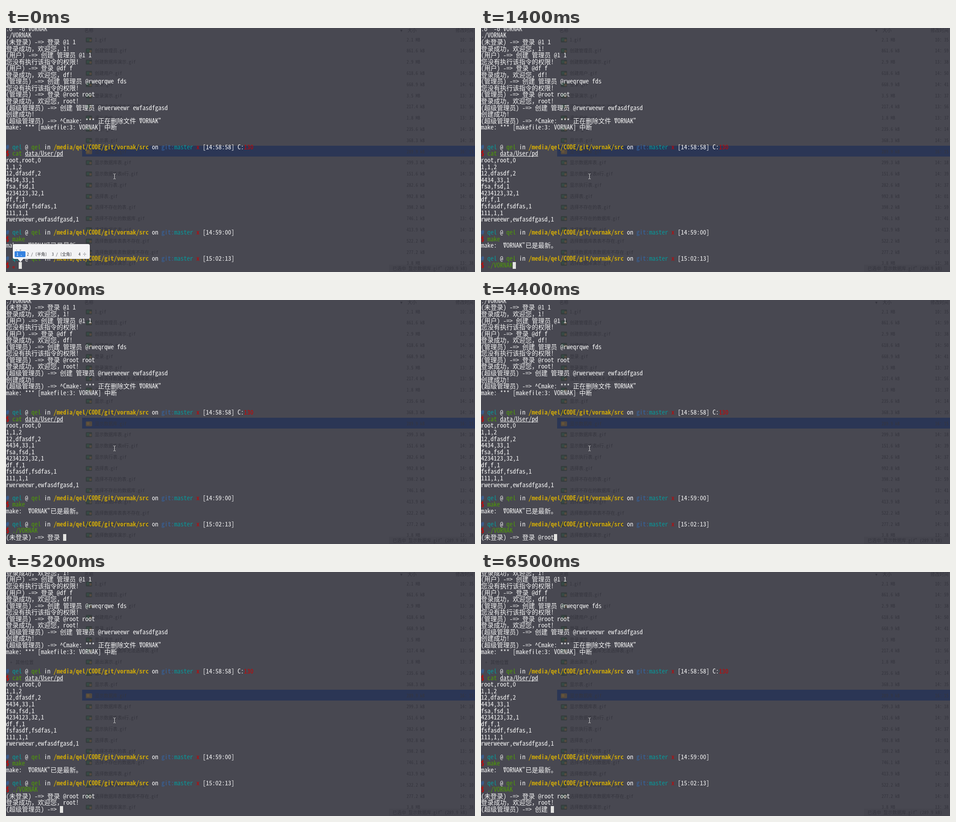
Write an HTML page with a canvas that moves like this. It is 1035 px wide and 541 px high and loops after 8000 ms.

```html
<!DOCTYPE html>
<html lang="zh">
<head>
<meta charset="utf-8">
<style>
html, body { margin: 0; width: 100%; height: 100%; overflow: hidden; background: #484851; }
canvas { display: block; }
</style>
</head>
<body>
<canvas id="stage" width="1035" height="541"></canvas>
<script>
const ctx = document.getElementById('stage').getContext('2d');
const FAMILY = '"Noto Sans Mono CJK SC", "Noto Sans Mono", "Noto Sans CJK SC", monospace';
const HAN_FAMILY = '"Noto Sans CJK SC", "Noto Sans Mono CJK SC", sans-serif';
const CELL = 7, PITCH = 14.56, LOOP = 8000;
const WHITE = '#f6f6f6', RED = '#cc0000', GREEN = '#4e9a06', TEAL = '#06989a',
      BLUE = '#3465a4', GOLD = '#cca70a', GREY = '#62646a', DIM = '#35353e', BACK = '#484851';

// Latin glyphs take half an em, whichever monospace font is present
ctx.font = '100px ' + FAMILY;
const latinScale = Math.min(1, 50 / ctx.measureText('M').width);

const isWide = c => /[\u2e80-\uffff]/.test(c);
const cells = s => [...s].reduce((n, c) => n + (isWide(c) ? 2 : 1), 0);

// Latest value whose start time has passed
const pick = (t, list) => list.filter(e => e[0] <= t).pop().slice(1);

function box(x, y, w, h, color, r = 0) {
  ctx.fillStyle = color;
  ctx.beginPath();
  ctx.roundRect(x, y, w, h, r);
  ctx.fill();
}

// Draws text on a grid of half-em cells and returns the end position
function gridText(s, x, y, size, color, bold) {
  ctx.fillStyle = color;
  for (const c of s) {
    ctx.font = c > '\x7f'
      ? `${bold ? 700 : 300} ${size}px ${HAN_FAMILY}`
      : `${bold ? 700 : 400} ${size * latinScale}px ${FAMILY}`;
    ctx.fillText(c, x, y);
    x += size / 2 * (isWide(c) ? 2 : 1);
  }
  return x;
}

// ---- file list behind the terminal ----
const files = `1|2.1 MB|10:35
创建管理员|861.6 kB|14:59
创建数据库演示|2.9 MB|13:38
创建用户|618.6 kB|14:50
登录|668.9 kB|14:41
登录演示|3.5 MB|13:37
没有选择数据库无法选择表|217.4 kB|13:56
退出演示|1.8 MB|13:37
显示|235.6 kB|14:14
显示表|368.3 kB|14:35
显示数据库|289.9 kB|16:15
显示数据库表|299.3 kB|14:18
显示数据库表n行|151.6 kB|14:39
显示执行表|282.6 kB|14:37
选择表|992.8 kB|14:01
选择不存在的表|398.2 kB|13:59
选择不存在的数据库|746.1 kB|13:41
选择数据库表|413.9 kB|14:12
选择数据库表表不存在|522.2 kB|14:10
选择数据库表数据库不存在|277.2 kB|14:03
选择数据库演示|3.8 MB|13:38`.split('\n').map(l => l.split('|'));

function drawFiles() {
  const small = (s, x, y) => gridText(s, x, y, 10, DIM);
  box(0, 0, 1035, 541, BACK);
  box(168, 261, 867, 24, '#2b3655');
  small('名称', 173, 9);
  small('▾', 870, 9);
  small('大小', 886, 9);
  small('修改时间', 992, 9);
  small('+', 9, 204);
  small('其他位置', 21, 204);
  files.forEach(([name, size, time], i) => {
    const y = Math.round(25.7 + i * 24.78);
    box(176, y - 5, 14, 11, i === 10 ? '#51483f' : '#363d3e', 2);
    box(178, y - 3, 6, 6, i === 10 ? '#645339' : '#364a44', 1);
    box(184, y - 1, 5, 5, '#544a40', 1);
    small(name + '.gif', 196, y + 4);
    small(size, 884, y + 4);
    small(time.replace(':', '：'), 1002, y + 4);
  });
  box(845, 525, 190, 16, '#45454e', 3);
  small('已选中“显示数据库.gif” (289.9 kB)', 853, 537);
}

// ---- terminal: a row is a list of [text, colour, bold, underline] ----
const plain = s => [[s, WHITE]];
const shell = (...parts) => [['$ ', RED, true], ...parts];
const prompt = (time, ...extra) => [
  ['# ', BLUE, true], ['qel', TEAL], [' @ ', WHITE], ['qel', GREEN], [' in ', WHITE],
  ['/media/qel/CODE/git/vornak/src', GOLD, true], [' on ', WHITE], ['git:', BLUE],
  ['master ', TEAL], ['x ', RED], [`[${time}]`, WHITE], ...extra];

const GUEST = '(未登录) -=> ', ADMIN = '(超级管理员) -=> ', RUN = './VORNAK';
const log = [
  ...`.o  -o VORNAK
./VORNAK
(未登录) -=> 登录 @1 1
登录成功，欢迎您，1!
(用户) -=> 创建 管理员 @1 1
您没有执行该指令的权限!
(用户) -=> 登录 @df f
登录成功，欢迎您，df!
(管理员) -=> 创建 管理员 @rweqrqwe fds
您没有执行该指令的权限!
(管理员) -=> 登录 @root root
登录成功，欢迎您，root!
(超级管理员) -=> 创建 管理员 @rwerweewr ewfasdfgasd
创建成功!
(超级管理员) -=> ^Cmake: *** 正在删除文件“VORNAK”
make: *** [makefile:3: VORNAK] 中断

`.split('\n').map(plain),
  prompt('14:58:58', [' C:', WHITE], ['130', RED]),
  shell(['cat ', GREEN], ['data/User/pd', WHITE, false, true]),
  ...'root,root,0 1,1,2 12,dfasdf,2 4434,33,1 fsa,fsd,1 4234123,32,1 df,f,1 fsfasdf,fsdfas,1 111,1,1 rwerweewr,ewfasdfgasd,1'
    .split(' ').map(plain),
  [],
  prompt('14:59:00'),
  shell(['make', GREEN]),
  plain('make: “VORNAK”已是最新。'),
  [],
  prompt('15:02:13')];

// Typed part, then the grey suggestion after the cursor
const command = [
  [0, ['。', RED, true], ''],
  [300, ['', WHITE], ''],
  [600, ['.', GREEN], RUN.slice(1)],
  [1100, ['./', WHITE, false, true], RUN.slice(2)],
  [1400, [RUN, GREEN], '']];
const login = [
  [1600, ''], [3700, '登录 '], [3800, '登录 @'],
  [4200, '登录 @r'], [4300, '登录 @roo'], [4400, '登录 @root'],
  [4600, '登录 @root '], [4700, '登录 @root r'], [4800, '登录 @root ro'],
  [5000, '登录 @root roo'], [5100, '登录 @root root']];
const create = [[5200, ''], [6300, '创建'], [6500, '创建 ']];

function screen(t) {
  if (t < 1600) {
    const [typed, hint] = pick(t, command);
    return { rows: [...log, shell(typed, [hint, GREY])], col: 2 + cells(typed[0]) };
  }
  const rows = [...log, shell([RUN, GREEN])];
  const input = GUEST + pick(t, login)[0];
  rows.push(plain(input));
  if (t < 5200) return { rows, col: cells(input) };
  const next = ADMIN + pick(t, create)[0];
  rows.push(plain('登录成功，欢迎您，root!'), plain(next));
  return { rows, col: cells(next) };
}

function drawTerminal(t) {
  const { rows, col } = screen(t);
  rows.forEach((row, i) => {
    const y = Math.round(531 - (rows.length - 1 - i) * PITCH);
    let x = 0;
    for (const [s, color, bold, line] of row) {
      const end = gridText(s, x, y, CELL * 2, color, bold);
      if (line) box(x, y + 1, end - x, 1, color);
      x = end;
    }
  });
  box(col * CELL, 519, CELL, 15, '#e4e4e2');
  if (t >= 600 && t < 1400) gridText(RUN[col - 2], col * CELL, 531, CELL * 2, BACK);
}

// ---- input method popup: left, top, width, typed keys, candidates, spacing ----
const words = s => s.split(' ');
const popups = [
  [0, 15, 479, 170, '. 。', [], 0],
  [100, null],
  [5600, 106, 476, 202, 'c', words('创建 出现 成功 查看 从'), 40],
  [5800, 106, 476, 202, 'chu', words('创建 出 处 除 初'), 40],
  [5900, 106, 476, 202, 'chuang', words('创建 创 窗 床 闯'), 40],
  [6100, 106, 476, 258, "chuang'jian", words('创建 创见 窗间 闯将 床'), 52],
  [6300, null]];

function drawPopup(t) {
  const [x, top, w, keys, list, gap] = pick(t, popups);
  if (x === null) return;
  ctx.save();
  ctx.shadowColor = '#0006';
  ctx.shadowBlur = 3;
  box(x, top, w, 512 - top, '#f3f3f5', 4);
  ctx.restore();
  ctx.fillStyle = '#f3f3f5';
  ctx.beginPath();
  ctx.moveTo(x + 10, 511);
  ctx.lineTo(x + 17, 519);
  ctx.lineTo(x + 24, 511);
  ctx.fill();
  const y = top + 26, ink = '#36363c';
  gridText(keys, x + 6, top + 14, 9, ink);
  box(x + 4, y - 10, list.length ? 35 : 24, 13, '#3582e0', 2);
  if (list.length) {
    list.forEach((s, i) => gridText(`${i + 1} ${s}`, x + 8 + i * gap, y, 9, i ? ink : '#fff'));
  } else {
    gridText('1 、', x + 8, y, 9, '#fff');
    gridText('2 /〔半角〕', x + 31, y, 9, ink);
    gridText('3 /〔全角〕', x + 86, y, 9, ink);
    gridText('4 ÷', x + 145, y, 9, ink);
  }
}

function drawPointer() {
  box(239, 324, 1, 10, '#d8d8d8');
  for (const y of [323, 334]) {
    box(237, y, 2, 1, '#d8d8d8');
    box(240, y, 2, 1, '#d8d8d8');
  }
}

function frame(now) {
  const t = now % LOOP;
  drawFiles();
  drawTerminal(t);
  drawPointer();
  drawPopup(t);
  requestAnimationFrame(frame);
}
requestAnimationFrame(frame);
</script>
</body>
</html>
```
